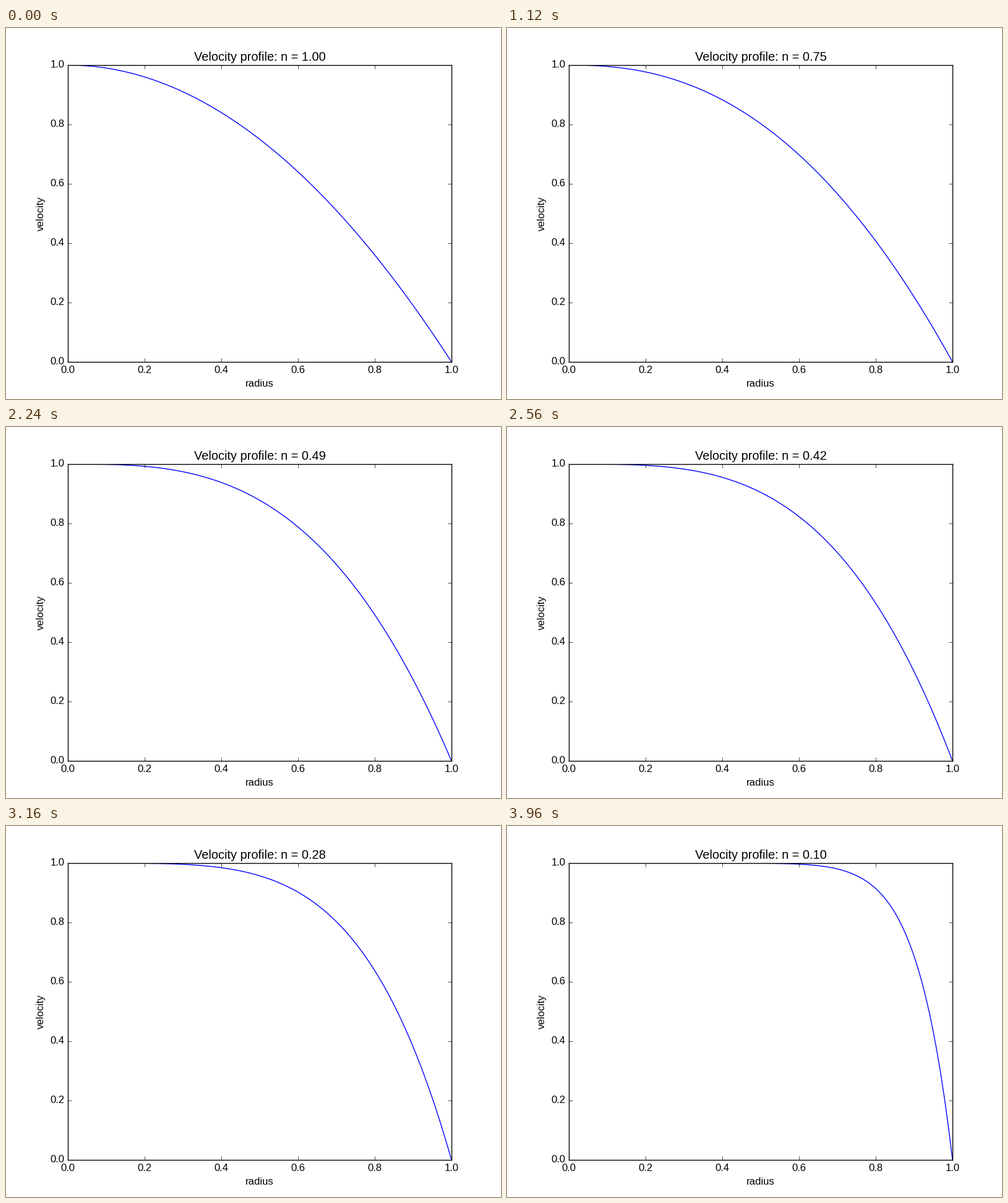
Recreate the animation shown at these times as a matplotlib script. Size 800 px wide and 600 px high, loop 4000 ms.

```python
import numpy as np
import matplotlib.pyplot as plt
from matplotlib.animation import FuncAnimation

FRAMES = 100
INTERVAL = 40

plt.style.use("classic")
plt.rcParams.update({
    "font.family": "Liberation Sans",
    "figure.dpi": 100,
    "savefig.dpi": 100,
    "figure.facecolor": "white",
    "ytick.alignment": "center",
})

fig = plt.figure(figsize=(8, 6))
ax = fig.add_axes([0.125, 0.1, 0.775, 0.8])
ax.set_xlim(0, 1)
ax.set_ylim(0, 1)
ax.set_xlabel("radius")
ax.set_ylabel("velocity")

radius = np.linspace(0, 1, 100)
indices = np.linspace(1.0, 0.1, FRAMES)
line, = ax.plot([], [], color="blue", linewidth=1.0)
title = ax.set_title("", y=1.0)


def update(i):
    """Power-law pipe flow: v = 1 - r^((n + 1) / n)."""
    n = indices[i]
    line.set_data(radius, 1 - radius ** ((n + 1) / n))
    title.set_text(f"Velocity profile: n = {n:.2f}")
    return line, title


def init():
    return update(0)


anim = FuncAnimation(fig, update, frames=FRAMES, init_func=init,
                     interval=INTERVAL, repeat=True, repeat_delay=0)
plt.show()
```
